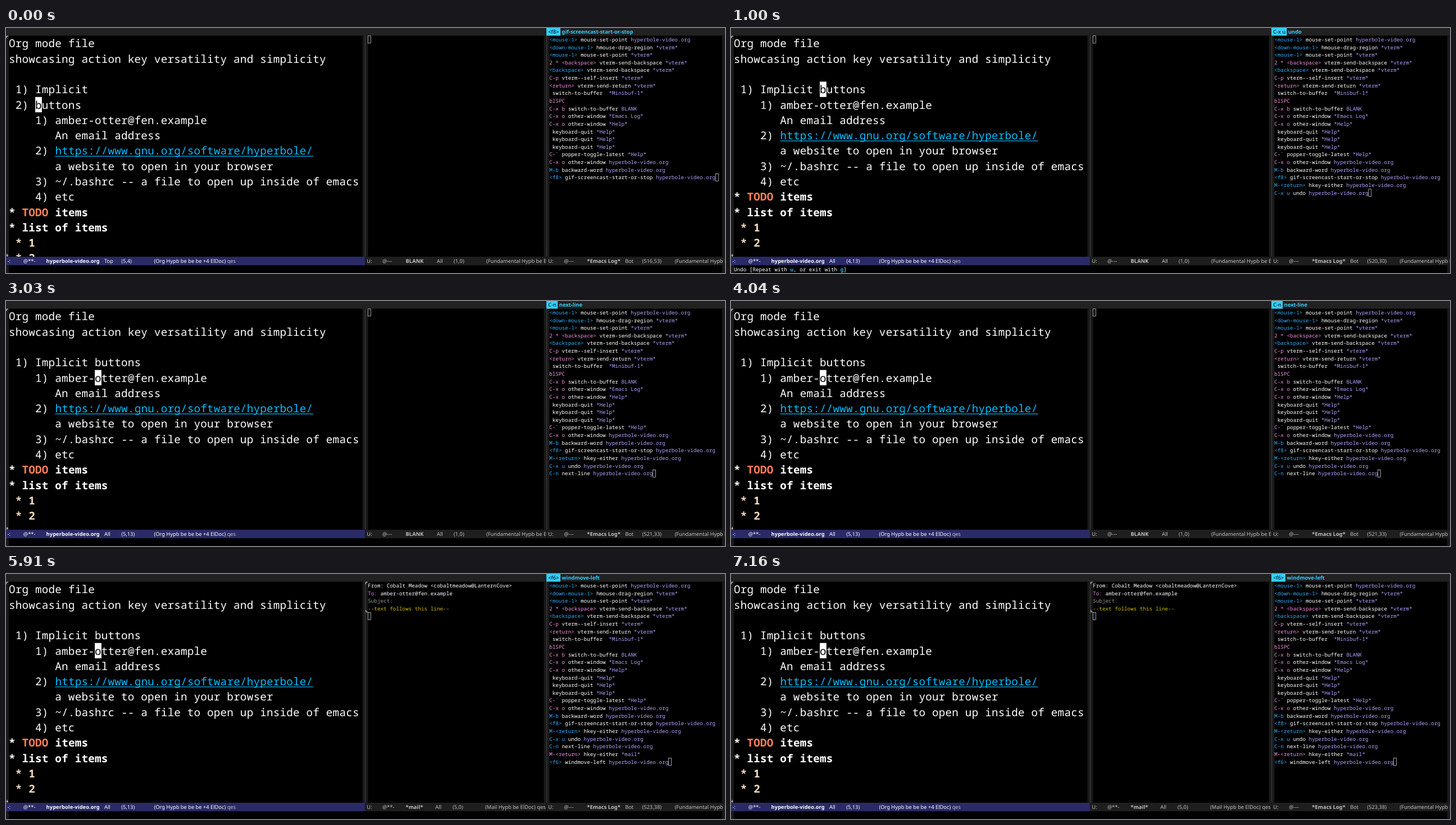
Animation, 1280 px wide and 436 px high, one loop 8000 ms. Source, as an HTML page:

```html
<!DOCTYPE html>
<html lang="en">
<head>
<meta charset="utf-8">
<title>Editor session</title>
<style>
html, body { margin: 0; width: 100%; height: 100%; overflow: hidden; background: #000; }
svg { display: block; width: 100%; height: 100%; }
text { white-space: pre; text-rendering: geometricPrecision; fill: #fff; }
.org { font: 19.3px "Noto Sans Mono", monospace; letter-spacing: .2px; }
.log { font: 9.3px "Noto Sans Mono", monospace; }
.bar { font: 9.3px "Noto Sans", sans-serif; }
.bold { font-weight: 700; }
.bar.bold { letter-spacing: .08px; }
.link { fill: #00bcff; }
.todo { fill: #ff8059; font-weight: 700; }
.sub { fill: #f8dec0; font-weight: 700; }
.blue { fill: #2fafff; }
.pink { fill: #f78fe7; }
.buf { fill: #b6a0ff; }
.gray { fill: #989898; }
.gold { fill: #d0bc00; }
.dark { fill: #000; }
.cyan { fill: #34cfff; font-weight: 700; }
.dim { fill: #bfc0c4; }
</style>
</head>
<body>
<svg id="stage" viewBox="0 0 1280 436" preserveAspectRatio="none"></svg>
<script>
const LOOP = 8000;
const TOP = 13.64, MODE = 406.9, ECHO = 422.4;
const SPLIT = [0, 639.2, 962.4, 1280];
const ORG = { x: 4.96, w: 11.78, h: 27.28, base: 20.8, cls: 'org' };
const MAIL = { x: 644.2, w: 5.58, h: TOP, base: 10.25, cls: 'log' };
const LOG = { ...MAIL, x: 967.2 };
const MINI = { ...MAIL, x: 4.96 };
const FILE = 'hyperbole-video.org';
const EMAIL = 'amber-otter@fen.example';

// colour of key | key | command | buffer
const history = [
  `blue|<mouse-1>|mouse-set-point|${FILE}`,
  'blue|<down-mouse-1>|hmouse-drag-region|*vterm*',
  'blue|<mouse-1>|mouse-set-point|*vterm*',
  'pink|2 * <backspace>|vterm-send-backspace|*vterm*',
  'blue|<backspace>|vterm-send-backspace|*vterm*',
  'pink|C-p|vterm--self-insert|*vterm*',
  'pink|<return>|vterm-send-return|*vterm*',
  'pink||switch-to-buffer| *Minibuf-1*',
  'pink|blSPC||',
  'pink|C-x b|switch-to-buffer|BLANK',
  'pink|C-x o|other-window|*Emacs Log*',
  'pink|C-x o|other-window|*Help*',
  'pink||keyboard-quit|*Help*',
  'pink||keyboard-quit|*Help*',
  'pink||keyboard-quit|*Help*',
  'pink|C-`|popper-toggle-latest|*Help*',
  `pink|C-x o|other-window|${FILE}`,
  `blue|M-b|backward-word|${FILE}`,
  `blue|<f8>|gif-screencast-start-or-stop|${FILE}`,
  `blue|M-<return>|hkey-either|${FILE}`,
  `blue|C-x u|undo|${FILE}`,
  `blue|C-n|next-line|${FILE}`,
  'pink|M-<return>|hkey-either|*mail*',
  `blue|<f6>|windmove-left|${FILE}`
].map(s => s.split('|'));

const steps = [
  { at: 0, count: 19, keyEnd: 987, split: true, cur: [4, 4, 'b'], where: '(5,4)', logPos: '(516,53)' },
  { at: 1000, count: 21, keyEnd: 989.4, cur: [3, 13, 'b'], where: '(4,13)', logPos: '(520,30)', undo: true },
  { at: 3030, count: 22, keyEnd: 982.2, cur: [4, 13, 'o'], where: '(5,13)', logPos: '(521,33)' },
  { at: 4710, count: 23, keyEnd: 1016.8, cur: [4, 13, 'o'], where: '(5,13)', logPos: '(522,29)', mail: true, inMail: true },
  { at: 5910, count: 24, keyEnd: 987, cur: [4, 13, 'o'], where: '(5,13)', logPos: '(523,38)', mail: true }
];

const esc = s => s.replace(/&/g, '&amp;').replace(/</g, '&lt;');
const text = (x, y, s, cls) => `<text x="${x}" y="${y}" class="${cls}">${esc(s)}</text>`;
const rect = (x, y, w, h, fill) => `<rect x="${x}" y="${y}" width="${w}" height="${h}" fill="${fill}"/>`;
const stroke = (d, w = 1) => `<path d="${d}" fill="none" stroke="#fff" stroke-width="${w}"/>`;

// Runs of [string, class] laid on the character grid of a pane.
function line(p, y, runs) {
  let col = 0;
  return runs.map(([s, cls = '']) => {
    const out = text(p.x + col * p.w, y, s, p.cls + ' ' + cls);
    col += s.length;
    return out;
  }).join('');
}
const row = (p, r, runs) => line(p, TOP + r * p.h + p.base, runs);

function box(p, r, c) {
  return `<rect x="${p.x + c * p.w + .31}" y="${TOP + r * p.h + .31}" width="${p.w - .62}" ` +
    `height="${p.h - .62}" fill="none" stroke="#fff" stroke-width=".62"/>`;
}
function block(p, r, c, ch = '') {
  const x = p.x + c * p.w, y = TOP + r * p.h;
  return rect(x, y, p.w, p.h, '#fff') + text(x, y + p.base, ch, p.cls + ' dark');
}

function orgPane(s) {
  const head = s.split ? [' 1) Implicit', ' 2) buttons'] : [' 1) Implicit buttons'];
  const rows = [
    'Org mode file', 'showcasing action key versatility and simplicity', '', ...head,
    '    1) ' + EMAIL,
    '       An email address',
    [['    2) '], ['https://www.gnu.org/software/hyperbole/', 'link']],
    '       a website to open in your browser',
    '    3) ~/.bashrc -- a file to open up inside of emacs',
    '    4) etc',
    [['* ', 'bold'], ['TODO', 'todo'], [' items', 'bold']],
    [['* list of items', 'bold']],
    [[' * 1', 'sub']],
    [[' * 2', 'sub']]
  ].map(r => typeof r === 'string' ? [[r]] : r);
  const link = rows.findIndex(r => r[1] && r[1][1] === 'link');
  const [r, c, ch] = s.cur;
  return rows.map((runs, i) => row(ORG, i, runs)).join('') +
    rect(ORG.x + 7 * ORG.w, TOP + link * ORG.h + ORG.base + 2.2, 39 * ORG.w, 1.2, '#00bcff') +
    (s.inMail ? box(ORG, r, c) : block(ORG, r, c, ch));
}

function mailPane(s) {
  if (!s.mail) return box(MAIL, 0, 0);
  return [
    [['From: Cobalt Meadow <cobaltmeadow@LanternCove>']],
    [['To:', 'pink'], [' ' + EMAIL]],
    [['Subject:', 'gray']],
    [['--text follows this line--', 'gold']]
  ].map((runs, i) => row(MAIL, i, runs)).join('') +
    stroke('M640.9 18V14.3H643.6M640.9 64V67.6H643.6', .9) +
    (s.inMail ? block : box)(MAIL, 4, 0);
}

function logPane(s) {
  const runs = history.slice(0, s.count).map(([color, key, cmd, buf]) =>
    [[key, color], [cmd && ' ' + cmd + ' '], [buf, 'buf']]);
  const end = runs[s.count - 1].reduce((n, r) => n + r[0].length, 0);
  return runs.map((r, i) => row(LOG, i, r)).join('') + box(LOG, s.count - 1, end);
}

// Mode line of pane n: [x, string] parts, the third one bold, the minor tail dim.
function modeLine(n, active, parts) {
  const x = SPLIT[n], w = SPLIT[n + 1] - x, h = ECHO - MODE;
  const cls = 'bar ' + (active ? '' : 'dim');
  const items = parts.map(([px, str], i) => {
    const tail = i === parts.length - 1 ? '<tspan class="dim"> qes</tspan>' : '';
    return `<text x="${px}" y="418.2" class="${cls}${i === 2 ? ' bold' : ''}">${esc(str)}${tail}</text>`;
  }).join('');
  return `<svg x="${x}" y="${MODE}" width="${w}" height="${h}" viewBox="${x} ${MODE} ${w} ${h}">` +
    rect(x, MODE, w, h, active ? '#2a2a66' : '#1e1e1e') + items + '</svg>';
}

function modeLines(s) {
  const plain = '(Fundamental Hypb be ElDoc)';
  const middle = s.mail
    ? [[642.3, 'U:'], [670, '@**-'], [711.5, '*mail*'], [764.3, 'All'], [795, '(5,0)'], [853, '(Mail Hypb be ElDoc)']]
    : [[642.3, 'U:'], [670, '@---'], [711.5, 'BLANK'], [767, 'All'], [797, '(1,0)'], [855, plain]];
  return modeLine(0, !s.inMail, [[2.6, '-:'], [30.8, '@**-'], [71.6, FILE],
      [175, s.split ? 'Top' : 'All'], [205.2, s.where], [263.4, '(Org Hypb be be be +4 ElDoc)']]) +
    modeLine(1, s.inMail, middle) +
    modeLine(2, false, [[965.3, 'U:'], [993.3, '@---'], [1034.3, '*Emacs Log*'],
      [1102.2, 'Bot'], [1132.4, s.logPos], [1190.4, plain]]);
}

function frame() {
  const edge = '#1a1a1a';
  const fringes = [634.6, 640, 957.6, 963].map(x => rect(x, TOP, 4.4, MODE - TOP, edge)).join('') +
    [0, 1275].map(x => rect(x, TOP, 5, 436 - TOP, edge)).join('');
  const rules = [639, 962.3].map(x => rect(x, TOP, .8, MODE - TOP, '#555')).join('');
  return rect(0, 0, 1280, 436, '#000') + rect(0, 0, 1280, TOP, '#212121') + fringes + rules +
    stroke('M.7 18V14.4H4', .9) + stroke('M2.2 402V406M.7 404.4L2.2 406.3L3.7 404.4', .9);
}

function keycast(s) {
  const [, key, cmd] = history[s.count - 1];
  return rect(962, 0, s.keyEnd - 962, TOP, '#34cfff') +
    text(965.2, 10.2, key, 'bar dark') + text(s.keyEnd + 2.6, 10.2, cmd, 'bar cyan');
}

function echo(s) {
  return s.undo ? line(MINI, ECHO + MINI.base, [['Undo [Repeat with '], ['u', 'blue bold'],
    [', or exit with '], ['g', 'blue bold'], [']']]) : '';
}

const stage = document.getElementById('stage');
let shown = null;

function draw(t) {
  const s = steps.filter(k => k.at <= t).pop();
  if (s === shown) return;
  shown = s;
  stage.innerHTML = frame() + keycast(s) +
    `<svg width="1280" height="${MODE}">${orgPane(s)}${mailPane(s)}${logPane(s)}</svg>` +
    modeLines(s) + echo(s);
}

const start = performance.now();
function tick() {
  draw((performance.now() - start) % LOOP);
  requestAnimationFrame(tick);
}
tick();
</script>
</body>
</html>
```
